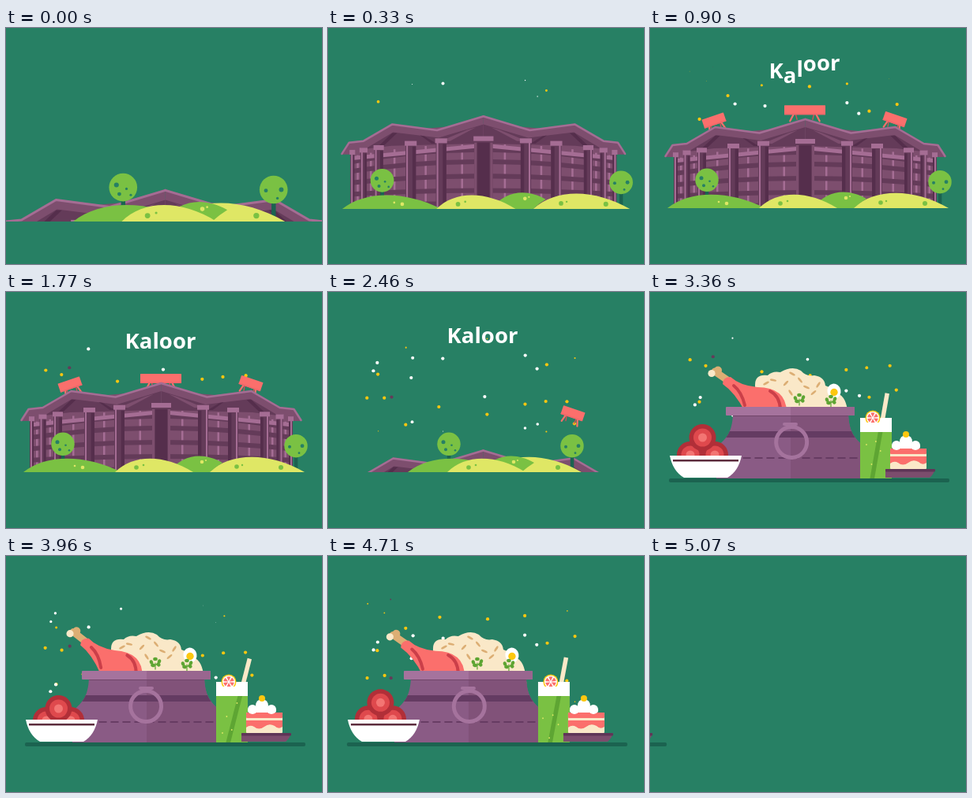
Animation, 400 px wide and 300 px high, one loop 5100 ms. Source, as an HTML page with a canvas:

```html
<!DOCTYPE html>
<html lang="en">
<head>
<meta charset="utf-8">
<title>Kaloor</title>
<style>
html, body { margin: 0; width: 100%; height: 100%; overflow: hidden; background: #278064; }
canvas { display: block; width: 400px; height: 300px; }
</style>
</head>
<body>
<canvas id="stage"></canvas>
<script>
const LOOP = 5100, BASE = 229, TABLE = 237;
const C = {
  bg: '#278064', deep: '#1b6350', green: '#7ac143', yellow: '#dfe765', leaf: '#5ea533',
  light: '#a56d94', mid: '#7d4e6e', dark: '#643b59', night: '#552e4c',
  red: '#fb6f6c', wine: '#b12f38', gold: '#fdc70f', white: '#fff', cream: '#fae8c8', tan: '#dcae74'
};
const cv = document.getElementById('stage');
const g = cv.getContext('2d');
const dpr = window.devicePixelRatio || 1;
cv.width = 400 * dpr;
cv.height = 300 * dpr;

const clamp = v => Math.max(0, Math.min(1, v));
const span = (t, a, b) => clamp((t - a) / (b - a));
const out = p => 1 - (1 - p) ** 3;
const back = p => 1 + 2.1 * (p - 1) ** 3 + 1.1 * (p - 1) ** 2;
const wave = (t, period) => (1 - Math.cos(2 * Math.PI * (t - 3360) / period)) / 2;

function group(draw, x = 0, y = 0) {
  g.save();
  g.translate(x, y);
  draw();
  g.restore();
}
function poly(fill, ...p) {
  g.beginPath();
  for (let i = 0; i < p.length; i += 2) g.lineTo(p[i], p[i + 1]);
  g.closePath();
  g.fillStyle = fill;
  g.fill();
}
function rect(fill, x, y, w, h, r = 0) {
  g.beginPath();
  g.roundRect(x, y, w, h, r);
  g.fillStyle = fill;
  g.fill();
}
function dot(fill, x, y, r, ry = r, a = 0) {
  g.beginPath();
  g.ellipse(x, y, r, ry, a, 0, 7);
  g.fillStyle = fill;
  g.fill();
}
function path(d, fill, stroke, w) {
  const p = new Path2D(d);
  if (fill) { g.fillStyle = fill; g.fill(p); }
  if (stroke) {
    g.strokeStyle = stroke;
    g.lineWidth = w;
    g.lineCap = g.lineJoin = 'round';
    g.stroke(p);
  }
}
function clipAbove(y) {
  g.beginPath();
  g.rect(-400, -400, 1200, 400 + y);
  g.clip();
}
function spin(x, y, a, draw) {
  group(() => { g.rotate(a); g.translate(-x, -y); draw(); }, x, y);
}

// Confetti: x, y at birth, first birth, speed in px/s, colour
const bits = [
  [50, 52, 840, 51, 'gold'], [71, 65, 840, 43, 'gold'], [80, 46, 840, 54, 'dark'],
  [141, 59, 610, 47, 'gold'], [249, 57, 600, 46, 'gold'], [275, 80, 1150, 45, 'gold'],
  [303, 62, 850, 48, 'gold'], [199, 68, 1160, 50, 'white'], [105, 48, 1310, 53, 'white'],
  [107, 67, 230, 44, 'white'], [63, 80, -20, 39, 'gold'], [63, 57, 1790, 49, 'white'],
  [57, 69, 1810, 48, 'white'], [98, 60, 410, 53, 'gold'], [146, 52, -40, 50, 'white'],
  [202, 51, 450, 52, 'gold'], [249, 60, 200, 50, 'white'], [265, 82, 200, 38, 'white'],
  [277, 67, 60, 46, 'gold'], [312, 75, 410, 45, 'gold']
];
function confetti(t) {
  const every = 1850, life = 2600;
  bits.forEach(([x, y, born, v, c], i) => {
    for (let b = born; b < t; b += every) {
      const age = t - b;
      if (age > life) continue;
      const r = 2.1 * Math.min(1, age / 400, (life - age) / 400) * clamp(t / 150);
      dot(C[c], x + .7 * Math.sin(age / 350 + i * 2), y + v * age / 1000, r);
    }
  });
}

// Stadium, built as two mirrored halves; u is the distance from the middle
const ledge = u => 150 + u * u * .0006;
const level = (u, f) => ledge(u) + (BASE - ledge(u)) * f;
function bandOf(fill, a, b, f, h) {
  poly(fill, a, level(a, f), b, level(b, f), b, level(b, f) + h, a, level(a, f) + h);
}
function halfStadium() {
  poly(C.mid, 0, 125, 115, 135, 164, 156, 164, BASE, 0, BASE);
  const cols = [[0, 20], [53, 13], [91, 13], [131, 11], [150, 8], [164, 5]];
  for (let i = 0; i < cols.length - 1; i++) {
    const a = cols[i][0], b = cols[i + 1][0], m = (a + b) / 2;
    rect(C.light, m - 1, ledge(m), 2.5, BASE - ledge(m));
    [.06, .25, .48, .71, .92].forEach(f => bandOf(C.dark, a, b, f, 6));
  }
  // roof
  poly(C.mid, 0, 115, 58, 132.5, 114, 125, 150, 146, 168, 148, 178, 164, 160, 164, 115, 155, 0, 150);
  poly(C.dark, 0, 126, 56, 143, 113, 136, 148, 157, 115, 153, 0, 150);
  poly(C.night, 108, 137, 114, 137, 134, 156, 128, 156);
  poly(C.night, 74, 141, 79, 140, 65, 150, 59, 150);
  poly(C.mid, 10, 130, 20, 133, 54, 147, 42, 147);
  path('M0 116L58 133.5L114 126L150 147L168 149L177 163', null, C.light, 2.5);
  // ledge and columns
  bandOf(C.light, 0, 164, 0, 5);
  cols.slice(1).forEach(([u, w]) => {
    const y = ledge(u) - 8;
    rect(C.dark, u - w / 2, y, w, BASE - y);
    rect(C.night, u - w / 2, y + 7, w / 3, BASE - y);
    rect(C.light, u + w / 2 - 3, y + 2, 2, BASE - y);
    rect(C.light, u - w / 2 - 1, y, w + 2, 6);
  });
}
function stadium() {
  [-1, 1].forEach(s => group(() => { g.scale(s, 1); halfStadium(); }, 196.5));
  rect(C.dark, 185, 142, 23, 87);
  rect(C.night, 189, 149, 15, 80);
  rect(C.mid, 185, 149, 3, 80);
  rect(C.mid, 205, 149, 3, 80);
  rect(C.light, 184, 141, 25, 6);
}
function board(x, y, w, h, a) {
  group(() => {
    g.rotate(a);
    [-1, 1].forEach(s => {
      path(`M${s * w * .28} ${h / 2}L${s * w * .36} ${h / 2 + 8}`, null, C.red, 2.2);
      path(`M${s * w * .22} ${h / 2}L${s * w * .19} ${h / 2 + 6}`, null, '#cf5058', 1.4);
    });
    rect(C.red, -w / 2, -h / 2, w, h, .6);
    rect('#f0676a', -w / 2, h / 2 - 1.5, w, 1.5);
  }, x, y);
}
function tree(x, y, dots) {
  rect(C.deep, x - 2.2, y + 8, 4.5, 24);
  dot(C.green, x, y, 14.7);
  dots.forEach(([dx, dy, r]) => dot(C.bg, x + dx, y + dy, r));
}
function hill(l, r, h, fill, spots, ink) {
  const w = r - l, top = BASE - h * 4 / 3;
  path(`M${l} ${BASE}C${l + w * .23} ${top} ${r - w * .37} ${top} ${r} ${BASE}Z`, fill);
  spots.forEach(([x, y, s]) => dot(ink, x, y, s));
}
function hills(k) {
  group(() => tree(72, 193.3, [[-7, -2.5, 2.5], [3.5, 1.5, 1.3], [-4, 7, 2], [8, 8, 1.3]]), 81 * k);
  group(() => tree(367, 195.7, [[-8, 1, 2], [8, 0, 2.4], [4, 9, 1.4]]), -58 * k);
  group(() => hill(22, 146, 17.3, C.green, [[87, 221, 1.3], [97, 223, 2.3]], C.yellow), 79 * k);
  group(() => hill(257, 378, 19.3, C.yellow, [[292, 222, 2.8], [299, 220, 1.2], [348, 223, 3]], C.green), -57 * k);
  group(() => {
    path('M205 229C225 206 249 203 274 217Q266 222 258 229Z', C.green);
    dot(C.yellow, 248, 216, 2.3);
    dot(C.yellow, 253, 214, 1.1);
  }, -13 * k);
  group(() => hill(138, 237, 17.3, C.yellow, [[165, 223, 2.8], [174, 220, 1.3]], C.green), 13 * k);
}
function arena(t) {
  const z = 1 - out(span(t, 0, 540));
  const fall = t0 => 85 * (Math.max(0, t - t0) / 340) ** 2;
  const rise = (a, b, d) => d * (1 - back(span(t, a, b)));
  group(() => {
    const s = 1 + .215 * z;
    g.translate(-37 * z, -32.25 * z);
    g.scale(s, s);
    clipAbove(BASE);
    [[81, 117.5, 29, 11.5, -.33, 400, 1980], [196, 110, 52, 12, 0, 600, 2050], [310, 116, 29, 11.5, .33, 430, 2233]]
      .forEach(([x, y, w, h, a, start, end]) =>
        board(x, y + rise(start, start + 450, 130) + fall(end), w, h, a));
    group(stadium, 0, rise(0, 560, 81) + fall(2120));
    const k = 1 - back(span(t, 0, 620)) + span(t, 2100, 2450) ** 2;
    group(() => hills(k), 0, 55 * span(t, 2470, 2630) ** 2);
  });
}

// Title
function title(t) {
  g.font = '600 27.5px "Noto Sans", "Open Sans", sans-serif';
  g.fillStyle = C.white;
  const word = 'Kaloor';
  const left = 195.5 - g.measureText(word).width / 2;
  const lift = 35 * span(t, 2250, 2740) ** 2;
  [...word].forEach((ch, i) => {
    const hit = 800 + i * 90, d = t - hit;
    let y = 0;
    if (d < 0) y = -18 * (1 - clamp((d + 250) / 250) ** 2);
    else if (d < 200) y = -8 * Math.sin(Math.PI * d / 200);
    else if (d < 320) y = -2.5 * Math.sin(Math.PI * (d - 200) / 120);
    g.globalAlpha = span(t, 560 + i * 20, 660 + i * 20) * (1 - span(t, 2600, 2770));
    g.fillText(ch, left + g.measureText(word.slice(0, i)).width, 71.5 + y - lift);
  });
  g.globalAlpha = 1;
}

// Feast
function herb(x, y) {
  path(`M${x} ${y + 8}L${x} ${y}M${x} ${y + 3}L${x - 5} ${y}M${x} ${y + 3}L${x + 5} ${y - 1}`, null, C.leaf, 1.2);
  [[-5, -1], [0, -5], [5, -2], [-3, 3], [4, 2]].forEach(([a, b]) => dot(C.leaf, x + a, y + b, 2.8, 2.2, a));
}
function rice() {
  path('M133 150L133 118Q133 104 149 106Q155 100 165 102Q180 93 191 100Q198 108 208 106Q221 108 222 119Q231 122 234 128Q247 130 250 150Z', C.cream);
  [[180, 104, .5], [172, 116, -.8], [190, 112, .9], [156, 112, .2], [207, 128, -.7], [213, 118, -1], [198, 121, .4], [178, 128, 1], [147, 116, -.5]]
    .forEach(([x, y, a]) => dot(C.tan, x, y, 4.2, 1.4, a));
  dot(C.white, 233, 126, 8.5, 9.5, -.2);
  dot(C.gold, 233, 127.5, 4.7);
  herb(189, 136);
  herb(229, 138);
}
function drumstick(a) {
  spin(150, 146, a, () => {
    path('M82 101L98 112', null, C.tan, 9);
    dot(C.tan, 86, 99.5, 5);
    dot(C.cream, 78, 103.5, 4.6);
    path('M92 117Q92 108 102 108Q114 119 136 121Q172 121 173 152L120 152Q108 128 92 117Z', C.red);
    path('M106 119Q116 127 120 144M152 126Q164 132 165 149', null, '#cb3f49', 4);
  });
}
function pot(t) {
  const shape = 'M105 152L251 152C251 176 258 186 272 197L272 237L84 237L84 197C98 186 105 176 105 152Z';
  group(() => {
    g.clip(new Path2D(shape));
    rect('#8a5b85', 80, 150, 200, 90);
    rect('#815279', 178, 150, 100, 90);
    rect('#643b62', 80, 177, 200, 8);
    rect('#704569', 105, 155, 150, 3);
  });
  g.setLineDash([9, 6]);
  path('M118 211L268 211', null, '#5d345b', 1.6);
  g.setLineDash([]);
  rect('#a5739d', 96, 146, 163, 11, 1);
  rect('#99668f', 178, 146, 81, 11, 1);
  rect('#a5739d', 168, 166, 19, 4, 2);
  spin(178, 168, .04 - .09 * (1 - wave(t, 1200)), () => {
    g.beginPath();
    g.arc(178, 191, 19.5, 0, 7);
    g.strokeStyle = '#a5739d';
    g.lineWidth = 5;
    g.stroke();
  });
}
function ball(x, y) {
  dot(C.wine, x, y, 17);
  dot('#df494d', x, y, 11.5);
  dot('#f37573', x, y, 5.5);
}
function bowl(t) {
  const w = wave(t, 1200);
  ball(51, 207 + 2 * w);
  ball(82, 207 + 2 * w);
  ball(66.5, 185 + 9 * w);
  path('M25 208L116 208Q112 228 98 236L43 236Q29 228 25 208Z', C.white);
  rect('#5c2c3d', 29, 213, 83, 2.4);
}
function straw(a, fill) {
  spin(281, 237, a, () => rect(fill, 278.5, 127, 5.5, 115));
}
function glass(t) {
  const a = .174 + .075 * wave(t, 1200);
  straw(a, C.cream);
  rect(C.white, 266, 160, 40, 19);
  rect(C.green, 266, 178, 40, 59);
  group(() => {
    g.beginPath();
    g.rect(266, 178, 40, 59);
    g.clip();
    straw(a, C.leaf);
    [[273, 0], [280, 21], [292, 38], [285, 50]].forEach(([x, o]) => {
      const d = (t * .025 + o) % 46;
      dot(C.yellow, x + Math.sin(d / 5), 232 - d, .9);
    });
  });
  dot(C.gold, 282, 160, 9.5);
  dot(C.white, 282, 160, 8);
  for (let i = 0; i < 6; i++) {
    const q = i * Math.PI / 3;
    g.beginPath();
    g.moveTo(282 + Math.cos(q + .45), 160 + Math.sin(q + .45));
    g.arc(282, 160, 6.8, q + .12, q + .9);
    g.closePath();
    g.fillStyle = C.red;
    g.fill();
  }
  rect(C.white, 273, 166, 19, 8);
}
function cake() {
  path('M298 225L361 225Q359 232 354 236L298 236Z', '#7c4d6d');
  rect('#5f3657', 298, 225, 63, 3.5, 1);
  rect(C.cream, 304, 199, 46, 26, 1);
  rect(C.red, 304, 199, 46, 7, 1);
  path('M304 209L350 209L350 217Q345 221 340 216Q333 212 327 217Q320 222 314 217Q309 214 304 218Z', C.red);
  [[312, 195, 6], [336, 195, 6], [324, 190, 8]].forEach(([x, y, r]) => dot(C.white, x, y, r));
  rect(C.white, 306, 194, 36, 5, 2);
  dot(C.gold, 324, 181, 4);
}
function feast(t) {
  if (t < 2600) return;
  const half = 177.5 * out(span(t, 2730, 3020));
  if (half > 0) rect(C.deep, 201.5 - half, 237, half * 2, 5, 2);
  const w = wave(t, 1200);
  const pop = (draw, start, d) =>
    group(() => draw(t), 0, d * (1 - back(span(t, start, start + 400))));
  group(() => {
    clipAbove(TABLE);
    pop(rice, 2760, 150);
    pop(() => drumstick(.068 * w), 2840, 150);
    pop(pot, 2620, 110);
    pop(bowl, 2740, 85);
    pop(glass, 2820, 125);
    pop(cake, 2900, 75);
  });
}

function frame(now) {
  const t = now % LOOP;
  g.setTransform(dpr, 0, 0, dpr, 0, 0);
  g.fillStyle = C.bg;
  g.fillRect(0, 0, 400, 300);
  group(() => {
    confetti(t);
    if (t < 2660) arena(t);
    feast(t);
  }, -355 * (Math.max(0, t - 4690) / 380) ** 3);
  title(t);
}
const start = performance.now();
function tick(now) {
  frame(Math.max(0, now - start));
  requestAnimationFrame(tick);
}
requestAnimationFrame(tick);
</script>
</body>
</html>
```
